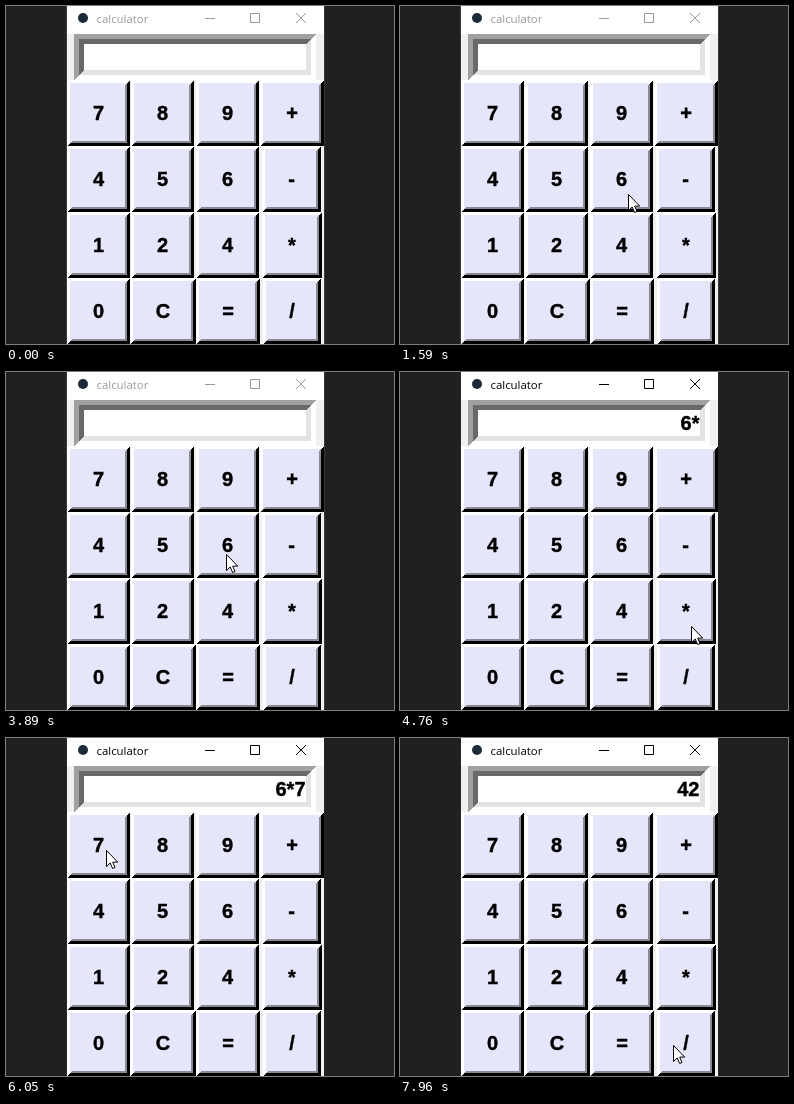
Animation, 388 px wide and 338 px high, one loop 8 s. Source, as an HTML page:

```html
<!DOCTYPE html>
<html lang="en">
<head>
<meta charset="utf-8">
<title>calculator</title>
<style>
  html, body { margin: 0; width: 100%; height: 100%; overflow: hidden; background: #202020; }
  svg { display: block; width: 388px; height: 338px; }
  .bold { font: bold 20px "Liberation Sans", Arial, sans-serif; stroke: #000; stroke-width: .4px; }
  .title { font: 11.4px "Open Sans", "Noto Sans", sans-serif; }
</style>
</head>
<body>
<svg id="stage" viewBox="0 0 388 338" xmlns="http://www.w3.org/2000/svg"></svg>
<script>
const NS = "http://www.w3.org/2000/svg";
const stage = document.getElementById("stage");
const LOOP = 8000;
const TICK = 70;

function add(parent, tag, attrs, text) {
  const el = document.createElementNS(NS, tag);
  for (const k in attrs) el.setAttribute(k, attrs[k]);
  if (text !== undefined) el.textContent = text;
  parent.appendChild(el);
  return el;
}

function rect(parent, x, y, width, height, fill) {
  return add(parent, "rect", { x, y, width, height, fill, "shape-rendering": "crispEdges" });
}

// Mitred frame; the pixels on the diagonal belong to the top-left colour
function ring(parent, x, y, w, h, b, topLeft, bottomRight) {
  rect(parent, x, y, w, h, bottomRight);
  add(parent, "path", {
    d: `M${x} ${y + h}V${y}H${x + w}v.5l${-b} ${b}H${x + b + .5}V${y + h - b}l${-b} ${b}z`,
    fill: topLeft, "shape-rendering": "crispEdges"
  });
}

function bevel(parent, x, y, w, h, outer, inner, c) {
  const b = outer + inner;
  ring(parent, x, y, w, h, outer, c[0], c[3]);
  ring(parent, x + outer, y + outer, w - 2 * outer, h - 2 * outer, inner, c[1], c[2]);
  rect(parent, x + b, y + b, w - 2 * b, h - 2 * b, c[4]);
}

// Outer light, inner light, inner dark, outer dark, face
const FACE = "#e6e6fa";
const RAISED = ["#fff", FACE, "#8a8a96", "#000", FACE];
const SUNKEN = ["#a0a0a0", "#696969", "#e3e3e3", "#fff", "#f0f0f0"];
const FIELD = [...SUNKEN.slice(0, 4), "#fff"];

// Window
rect(stage, 0, 0, 388, 338, "#202020");
const edge = rect(stage, 60, 0, 259, 338, "#3a3a3a");
rect(stage, 61, 0, 257, 338, "#f0f0f0");
rect(stage, 61, 0, 257, 28, "#fff");
add(stage, "circle", { cx: 77, cy: 12, r: 5, fill: "#1b2a38" });
const title = add(stage, "text", { x: 90.5, y: 17, class: "title" }, "calculator");
const controls = add(stage, "path", {
  d: "M199 12.5h10M244.5 7.5h9v9h-9zM290 7l10 10M300 7l-10 10", fill: "none"
});
bevel(stage, 68, 28, 242, 46, 5, 5, FIELD);
const display = add(stage, "text", { x: 299.5, y: 58, class: "bold", "text-anchor": "end" });

// A key is as wide as its glyph plus padding; the widest key sets its column
const PAD = 52, ROW = 66;
const keys = {};

function keyWidth(label) {
  display.textContent = label;
  return PAD + Math.round(display.getComputedTextLength());
}

function addKey(label, x, y, w) {
  const key = {};
  for (const [state, colors, shift] of [["up", RAISED, 0], ["down", SUNKEN, 1]]) {
    const g = key[state] = add(stage, "g", {});
    bevel(g, x, y, w, ROW, 3, 2, colors);
    add(g, "text", {
      x: x + w / 2 + shift, y: y + 40 + shift, class: "bold", "text-anchor": "middle"
    }, label);
  }
  key.down.setAttribute("display", "none");
  keys[label] = key;
}

let left = 61;
for (const column of ["7410", "852C", "964=", "+-*/"]) {
  const widths = [...column].map(keyWidth);
  const span = Math.max(...widths);
  widths.forEach((w, r) => addKey(column[r], left + Math.floor((span - w) / 2), 74 + ROW * r, w));
  left += span;
}

const cursor = add(stage, "path", {
  d: "M.5 .5V16.5L4.2 13L6.6 18.5L9 17.5L6.7 12.1H11.7z",
  fill: "#fff", stroke: "#000"
});

// The pointer starts below the stage; each glide leads on from the last
const moves = [];
let last = { x: 363, y: 355 };

function glide(start, end, x, y) {
  const to = { x, y };
  moves.push({ start, from: last, to, steps: Math.round((end - start) / TICK) + 1 });
  last = to;
}

const presses = [];
const press = (label, down, up) => presses.push({ label, down, up });

glide(70, 380, 231, 162);
glide(710, 920, 233, 206);
glide(1180, 1800, 225, 176);
glide(2680, 2680, 225, 185);
glide(2750, 2890, 222, 252);
glide(3150, 3490, 220, 189);
glide(3820, 3890, 220, 182);
press("6", 4090, 4160);
glide(4290, 4430, 291, 254);
press("*", 4690, 4760);
glide(4830, 5450, 112, 117);
glide(5520, 5660, 100, 112);
press("7", 5920, 6050);
glide(6330, 6820, 242, 319);
glide(6890, 7090, 233, 306);
press("=", 7160, 7230);
glide(7890, 7960, 273, 307);

function pointer(t) {
  const move = moves.filter(m => t >= m.start).pop();
  if (!move) return null;
  const { start, from, to, steps } = move;
  const u = Math.min(1, (Math.floor((t - start) / TICK) + 1) / steps);
  const mix = k => Math.round(from[k] + (to[k] - from[k]) * u);
  return `translate(${mix("x")} ${mix("y")})`;
}

function product(text) {
  return String(text.split("*").reduce((a, b) => a * b));
}

function readout(t) {
  return presses.filter(p => t >= p.up)
    .reduce((text, p) => p.label === "=" ? product(text) : text + p.label, "");
}

const show = (el, on) => el.setAttribute("display", on ? "inline" : "none");

function draw(t) {
  const active = t >= presses[0].down;
  edge.setAttribute("fill", active ? "#262626" : "#3a3a3a");
  title.setAttribute("fill", active ? "#000" : "#999");
  controls.setAttribute("stroke", active ? "#000" : "#999");
  display.textContent = readout(t);

  for (const { label, down, up } of presses) {
    const held = t >= down && t < up;
    show(keys[label].up, !held);
    show(keys[label].down, held);
  }

  const at = pointer(t);
  show(cursor, at);
  if (at) cursor.setAttribute("transform", at);
}

const began = performance.now();
function tick() {
  draw((performance.now() - began) % LOOP);
  requestAnimationFrame(tick);
}
tick();
</script>
</body>
</html>
```
